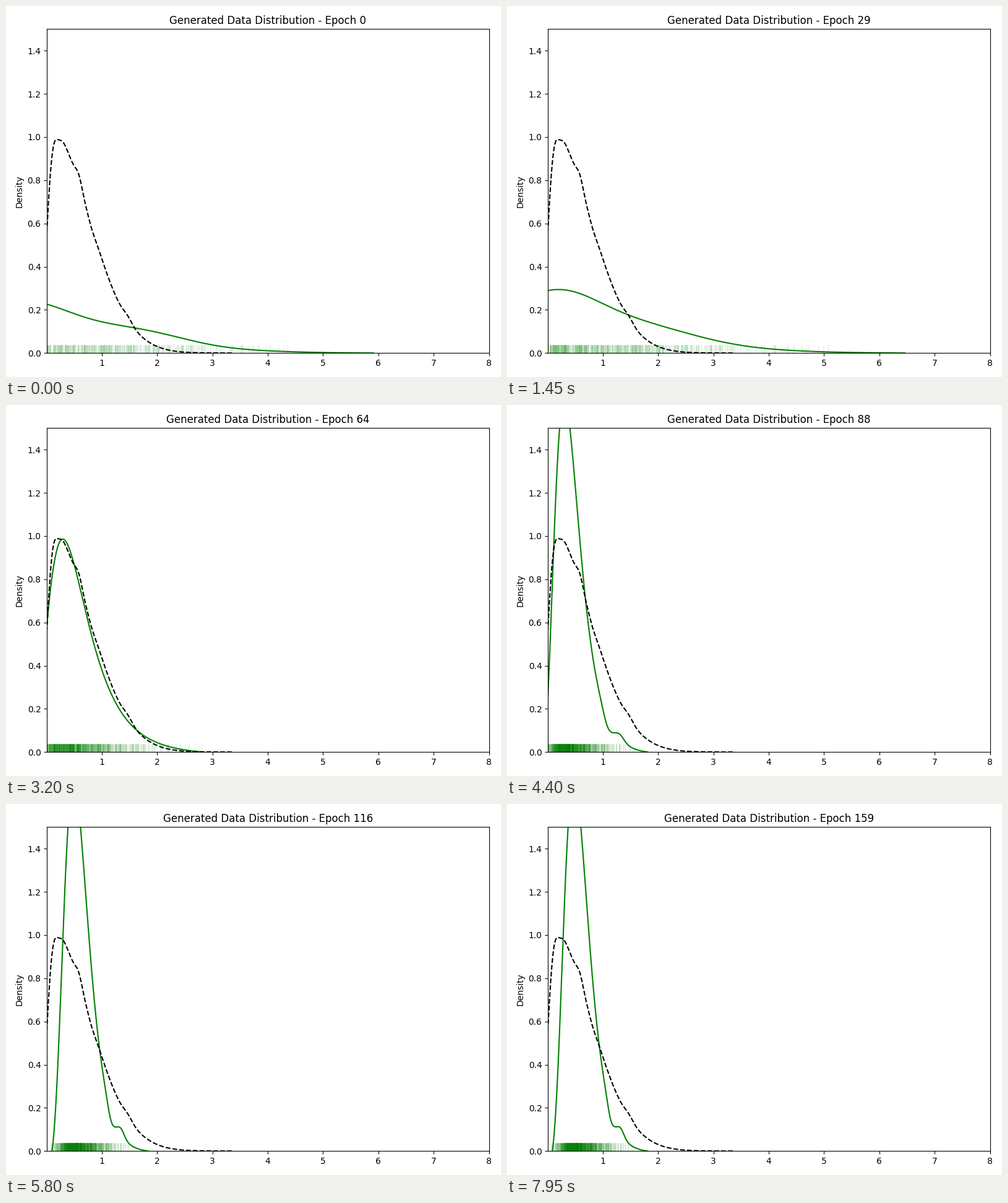
These frames come from a looping animation (800x600 px, 8000 ms). A matplotlib script:

```python
import math
import numpy as np
import matplotlib.pyplot as plt
from matplotlib.animation import FuncAnimation
from matplotlib.collections import LineCollection

FRAMES, INTERVAL = 160, 50
SAMPLES = 1000
RUG_HEIGHT = 0.025

# The generator maps noise z to median + spread * (exp(skew * z) - 1) / skew.
EPOCHS = [0, 14, 45, 64, 88, 116, 159]
MEDIAN = [-0.42, 0, 0.7, 0.49, 0.403, 0.57, 0.555]
SPREAD = [1.8, 2, 0.84, 0.454, 0.265, 0.247, 0.245]
SKEW = [0.02, 0.02, 0.35, 0.48, 0.4, 0.33, 0.33]
REACH = [3.4, 3.5, 2.8, 2.6, 2.85, 3, 3]


def bump(x, centre, width):
    return np.exp(-0.5 * ((x - centre) / width) ** 2)


def generate(z, epoch):
    median, spread, skew = (np.interp(epoch, EPOCHS, v) for v in (MEDIAN, SPREAD, SKEW))
    return median + spread * np.expm1(skew * z) / skew


def generated_density(epoch):
    """Normal density carried through the generator, with a little unevenness."""
    spread, skew, reach = (np.interp(epoch, EPOCHS, v) for v in (SPREAD, SKEW, REACH))
    z = np.linspace(-reach, reach, 400)
    height = bump(z, 0, 1) / math.sqrt(2 * math.pi) / (spread * np.exp(skew * z))
    early = np.clip(1 - epoch / 60, 0, 1)
    late = np.clip((epoch - 64) / 24, 0, 1)
    height *= 1 + 0.1 * early * np.cos(2 * np.pi * z / 1.5)
    height *= 1 + late * (0.45 * bump(z, 2.2, 0.12) - 0.25 * bump(z, 1.82, 0.14))
    height *= 1 - (z / reach) ** 10
    return generate(z, epoch), height


def real_density():
    """Half-normal with a softened edge at zero and a few ripples."""
    sigma, soft = 0.75, 0.09
    x = np.linspace(-3 * soft, 3.36, 200)
    edge = 0.5 + 0.5 * np.vectorize(math.erf)(x / soft / math.sqrt(2))
    y = 2 / (sigma * math.sqrt(2 * math.pi)) * bump(x, 0, sigma) * edge
    y += 0.042 * bump(x, 0.585, 0.06) - 0.025 * bump(x, 0.21, 0.05)
    y += 0.017 * bump(x, 1.47, 0.08) - 0.012 * bump(x, 0.82, 0.06)
    return x, y


noise = np.random.default_rng(4).standard_normal(SAMPLES)
noise = noise[noise < 2.6]

fig, ax = plt.subplots(figsize=(8, 6), dpi=100)
ax.set_xlim(0.01, 8)
ax.set_ylim(0, 1.5)
ax.set_ylabel("Density")
title = ax.set_title("Generated Data Distribution - Epoch 0")
fig.tight_layout()

curve, = ax.plot([], [], color="green", lw=1.5)
rug = LineCollection([], colors="green", linewidths=1, alpha=0.1,
                     transform=ax.get_xaxis_transform())
ax.add_collection(rug, autolim=False)
ax.plot(*real_density(), "k--", lw=1.5)


def update(epoch):
    curve.set_data(*generated_density(epoch))
    segments = np.zeros((len(noise), 2, 2))
    segments[:, :, 0] = generate(noise, epoch)[:, None]
    segments[:, 1, 1] = RUG_HEIGHT
    rug.set_segments(segments)
    title.set_text(f"Generated Data Distribution - Epoch {epoch}")
    return curve, rug, title


anim = FuncAnimation(fig, update, frames=FRAMES, interval=INTERVAL,
                     repeat=True, repeat_delay=0, blit=False)
plt.show()
```
